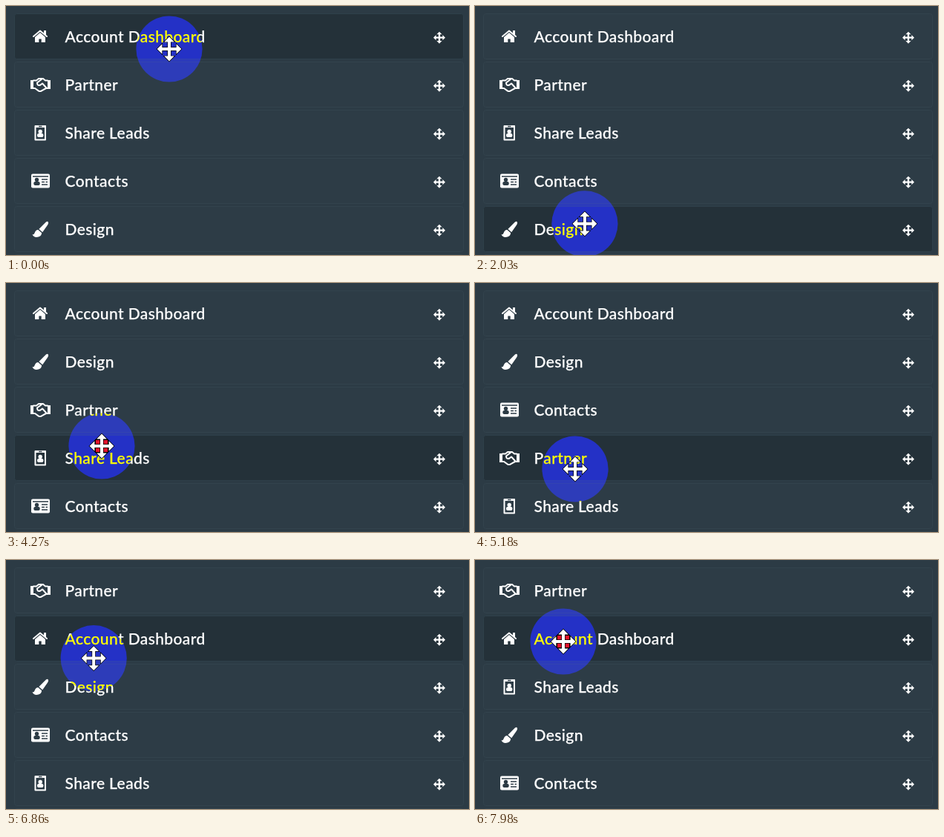
Animation of 624 by 336 pixels, one loop 8 s. Source, as an HTML page:

```html
<!DOCTYPE html>
<html lang="en">
<head>
<meta charset="utf-8">
<title>Sortable menu</title>
<style>
  html, body { margin: 0; width: 100%; height: 100%; overflow: hidden; background: #2c3b45; }
  svg { display: block; width: 624px; height: 336px; isolation: isolate; }
  text { font: 500 21px Lato, "Open Sans", sans-serif; letter-spacing: .4px; fill: #fff; stroke: #fff; stroke-width: .25; }
  .box { fill: #2d3c46; stroke: #33434d; }
  .hot .box { fill: #243139; stroke: #2f404a; }
  .solid { fill: #fff; }
  .line { fill: none; stroke: #fff; stroke-width: 2; stroke-linejoin: round; stroke-linecap: round; }
  .dark { fill: #2c3b45; }
  .cut { fill: none; stroke: #2c3b45; stroke-width: 1.4; }
  #spot { fill: #00f; mix-blend-mode: difference; }
  #arrows { fill: #fff; stroke: #000; stroke-width: 1.4; paint-order: stroke; }
  #press { fill: #e3132c; stroke: #000; }
</style>
</head>
<body>
<svg viewBox="0 0 624 336">
  <rect width="624" height="336" fill="#2c3b45"/>
  <rect class="box" x="11.5" y="335.5" width="605" height="61" rx="3"/>
  <g id="list"></g>
  <circle id="spot" r="44.6"/>
  <g id="pointer">
    <rect id="press" x="-8.5" y="-8.5" width="17" height="17"/>
    <path id="arrows"/>
  </g>
</svg>
<script>
const LOOP = 8000, STEP = 70, PITCH = 65, FIRST = 41;

const person = (x, y) => `<circle cx="${x}" cy="${y}" r="2.7"/>
  <rect x="${x - 4.2}" y="${y + 2.6}" width="8.4" height="5" rx="2"/>`;

const icons = {
  'Account Dashboard': `
    <path class="line" d="M37 0 46 -7.5 55 0"/>
    <path class="solid" d="M51 -8H54V-1L51 -4ZM39 1 46 -5 53 1V8H47.7V3.5H44.3V8H39Z"/>`,
  'Partner': `
    <path class="solid" d="M33 -6H37V6H33ZM56 -6H60V6H56Z"/>
    <path class="line" d="M37 -5.5H41L44 -8H50L53 -5.5H56M37 5H39L44 8.6Q46 9.6 48 8.3L54 5H56
      M48.5 -7.5 42 -2.5Q42 2.5 46.5 .5L49 -1.5 54.5 4.5"/>`,
  'Share Leads': `
    <path class="line" d="M39.5 -9H53V9.5H39.5Z"/>
    <path class="solid" d="M39 -10H53.5V-7H39Z"/>
    <path class="cut" d="M44 -8.5H48.5"/>
    <g class="solid">${person(46.2, -1.6)}</g>`,
  'Contacts': `
    <rect class="solid" x="34" y="-9.5" width="25" height="19" rx="2"/>
    <path class="cut" d="M36 -6H57M48 -2H56M48 1.5H52M53.5 1.5H56M48 5H56"/>
    <g class="dark">${person(41.5, -1.6)}</g>`,
  'Design': `
    <path class="solid" d="M56.5 -10Q58 -8.3 55.7 -5L49.2 4.2 44.4 0 53.6 -9.2Q55.4 -10.9 56.5 -10Z
      M43.3 .9 48.2 5.2Q47.5 10.9 41 10.9 37.3 10.9 35.3 7.3 38 8 38.8 4.8 40 .9 43.3 .9Z"/>`
};
const names = Object.keys(icons);

// Pointer script: each step starts where the last one ended
const steps = [];
let last = { x: 220, y: 58 };

function move(start, end, x, y, drag = {}) {
  steps.push({ start, end, x0: last.x, y0: last.y, x, y, ...drag });
  last = { x, y };
}

function drag(start, end, x, name, by) {
  move(start, end, x, last.y + by * PITCH, {
    item: names.indexOf(name), by, down: start - STEP, up: end + STEP
  });
}

move(70, 420, 214, 46);
move(1400, 2100, 146, 301);
drag(2240, 2950, 147, 'Design', -3);
move(3500, 4200, 129, 220);
drag(4270, 4550, 130, 'Share Leads', 1);
move(4620, 4830, 133, 186);
drag(4900, 5110, 135, 'Partner', 1);
drag(5320, 6300, 123, 'Partner', -3);
move(6370, 6440, 121, 46);
move(6580, 7280, 113, 292);
drag(7350, 7630, 117, 'Share Leads', -2);
move(7700, 7910, 119, 110);
drag(LOOP + 50, LOOP + 400, 119, 'Account Dashboard', 1);

const ease = u => u * u * (3 - 2 * u);
const progress = (s, t) => ease(Math.min(1, Math.max(0, (t - s.start) / (s.end - s.start))));

function cross(reach, head, half, arm) {
  const neck = reach - head;
  const side = [[-arm, -arm], [-arm, -neck], [-half, -neck], [0, -reach], [half, -neck], [arm, -neck]];
  const points = [];
  for (let i = 0; i < 4; i++) {
    for (let [x, y] of side) {
      for (let k = 0; k < i; k++) [x, y] = [-y, x];
      points.push(x + ' ' + y);
    }
  }
  return 'M' + points.join('L') + 'Z';
}

const $ = id => document.getElementById(id);
const grip = cross(8, 3.6, 3.6, 1.15);
$('arrows').setAttribute('d', cross(16.4, 6.8, 6.8, 2));
$('list').innerHTML = names.map(name => `<g>
  <rect class="box" x="11.5" y="-30.5" width="605" height="61" rx="3"/>
  ${icons[name]}<text x="79.5" y="7.5">${name}</text>
  <path class="solid" transform="translate(584 1.7)" d="${grip}"/></g>`).join('');
const rows = [...$('list').children];

function pointer(t) {
  const s = steps.filter(s => s.start <= t).pop() || steps[0];
  const e = progress(s, t);
  return [s.x0 + (s.x - s.x0) * e, s.y0 + (s.y - s.y0) * e];
}

function place(order, item, slot) {
  const rest = order.filter(i => i !== item);
  rest.splice(slot, 0, item);
  return rest;
}

function draw(t) {
  const [x, y] = pointer(t);
  let order = names.map((_, i) => i), held = -1, heldY = 0;
  for (const s of steps.filter(s => s.by && s.down <= t)) {
    const slot = order.indexOf(s.item) + s.by * progress(s, t);
    order = place(order, s.item, Math.round(slot));
    if (t < s.up) {
      held = s.item;
      heldY = FIRST + slot * PITCH;
    }
  }
  const hot = held < 0 ? order[Math.floor((y - 10) / PITCH)] : held;
  rows.forEach((row, i) => {
    const rowY = i === held ? heldY : FIRST + order.indexOf(i) * PITCH;
    row.setAttribute('transform', `translate(0 ${rowY})`);
    row.classList.toggle('hot', i === hot);
  });
  if ($('list').lastChild !== rows[hot]) $('list').append(rows[hot]);
  for (const id of ['spot', 'pointer']) $(id).setAttribute('transform', `translate(${x} ${y})`);
  $('press').style.display = held < 0 ? 'none' : '';
}

const began = performance.now();
function tick() {
  const t = Math.max(0, performance.now() - began) % LOOP;
  draw(Math.floor(t / STEP) * STEP);
  requestAnimationFrame(tick);
}
tick();
</script>
</body>
</html>
```
